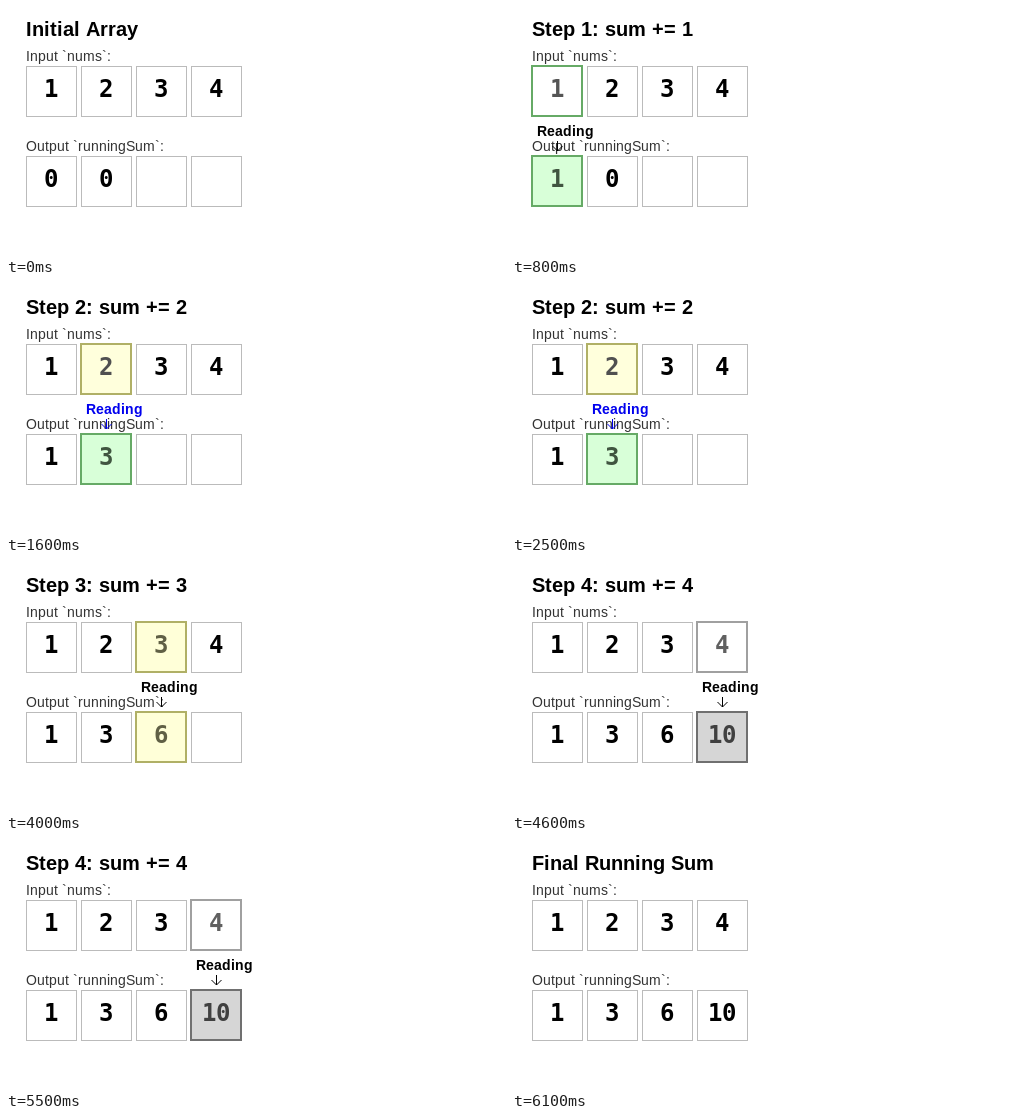
Animation, 500 px wide and 250 px high, one loop 7600 ms. Source, as an HTML page with a canvas:

```html
<!DOCTYPE html>
<html lang="en">
<head>
<meta charset="utf-8">
<title>Running sum</title>
<style>
  html, body { margin: 0; width: 100%; height: 100%; overflow: hidden; background: #fff; }
  canvas { display: block; }
</style>
</head>
<body>
<canvas id="stage" width="500" height="250"></canvas>
<script>
const ctx = document.getElementById("stage").getContext("2d");
const nums = [1, 2, 3, 4];
const cellSize = 50, cellPitch = 55, left = 20;

const sans = '"Liberation Sans", Arial, sans-serif';
const fonts = {
  title: `bold 20px ${sans}`,
  label: `14px ${sans}`,
  reading: `bold 14px ${sans}`,
  digit: 'bold 24px "DejaVu Sans Mono", monospace',
};

// Cell styles: [fill, border, digit colour]
const plain = ["#fff", "#bbb", "#000"];
const plainGreen = ["#fff", "#66aa66", "#555"];
const green = ["#d8ffd8", "#66aa66", "#405540"];
const paleYellow = ["#ffffdc", "#b0b066", "#505050"];
const yellow = ["#ffffd8", "#b0b066", "#606045"];
const plainGray = ["#fff", "#a0a0a0", "#606060"];
const gray = ["#d6d6d6", "#707070", "#404040"];

const steps = [
  { at: 0, title: "Initial Array", sums: [0, 0] },
  { at: 800, title: "Step 1: sum += 1", sums: [1, 0], active: 0, input: plainGreen, output: green },
  { at: 1600, title: "Step 2: sum += 2", sums: [1, 3], active: 1, input: paleYellow, output: green, accent: "#00e" },
  { at: 3100, title: "Step 3: sum += 3", sums: [1, 3, 6], active: 2, input: yellow, output: yellow },
  { at: 4600, title: "Step 4: sum += 4", sums: [1, 3, 6, 10], active: 3, input: plainGray, output: gray },
  { at: 6100, title: "Final Running Sum", sums: [1, 3, 6, 10] },
];
const duration = 7600;

const advance = char => Math.round(ctx.measureText(char).width);

// Sets text on whole-pixel advances, without kerning.
function text(x, y, font, value, color = "#000", centered = false) {
  ctx.font = fonts[font];
  ctx.fillStyle = color;
  const chars = [...String(value)];
  if (centered) x -= chars.reduce((sum, char) => sum + advance(char), 0) / 2;
  for (const char of chars) {
    ctx.fillText(char, x, y);
    x += advance(char);
  }
}

function row(y, values, active, activeStyle) {
  const drawCell = i => {
    const style = i === active ? activeStyle : plain;
    const [fill, border, color] = style;
    const x = left + i * cellPitch;
    const inset = style === plain ? 0.5 : 0;
    const box = [x + inset, y + inset, cellSize, cellSize];
    ctx.fillStyle = fill;
    ctx.fillRect(...box);
    ctx.strokeStyle = border;
    ctx.lineWidth = style === plain ? 1 : 2;
    ctx.strokeRect(...box);
    text(x + 25, y + 31, "digit", values[i] ?? "", color, true);
  };
  nums.forEach((_, i) => drawCell(i));
}

function pointer(index, color = "#000") {
  const x = left + index * cellPitch;
  text(x + 5, 130, "reading", "Reading", color);
  ctx.strokeStyle = color;
  ctx.lineWidth = 1;
  ctx.stroke(new Path2D(`M${x + 25.5} 135v10m-5 -5l5 5l5 -5`));
}

function draw({ title, sums, active, input, output, accent }) {
  ctx.fillStyle = "#fff";
  ctx.fillRect(0, 0, 500, 250);
  text(left, 30, "title", title);
  text(left, 55, "label", "Input `nums`:", "#333");
  row(60, nums, active, input);
  text(left, 145, "label", "Output `runningSum`:", "#333");
  row(150, sums, active, output);
  if (active !== undefined) pointer(active, accent);
}

function tick() {
  const time = performance.now() % duration;
  draw(steps.findLast(step => step.at <= time));
  requestAnimationFrame(tick);
}
tick();
</script>
</body>
</html>
```
